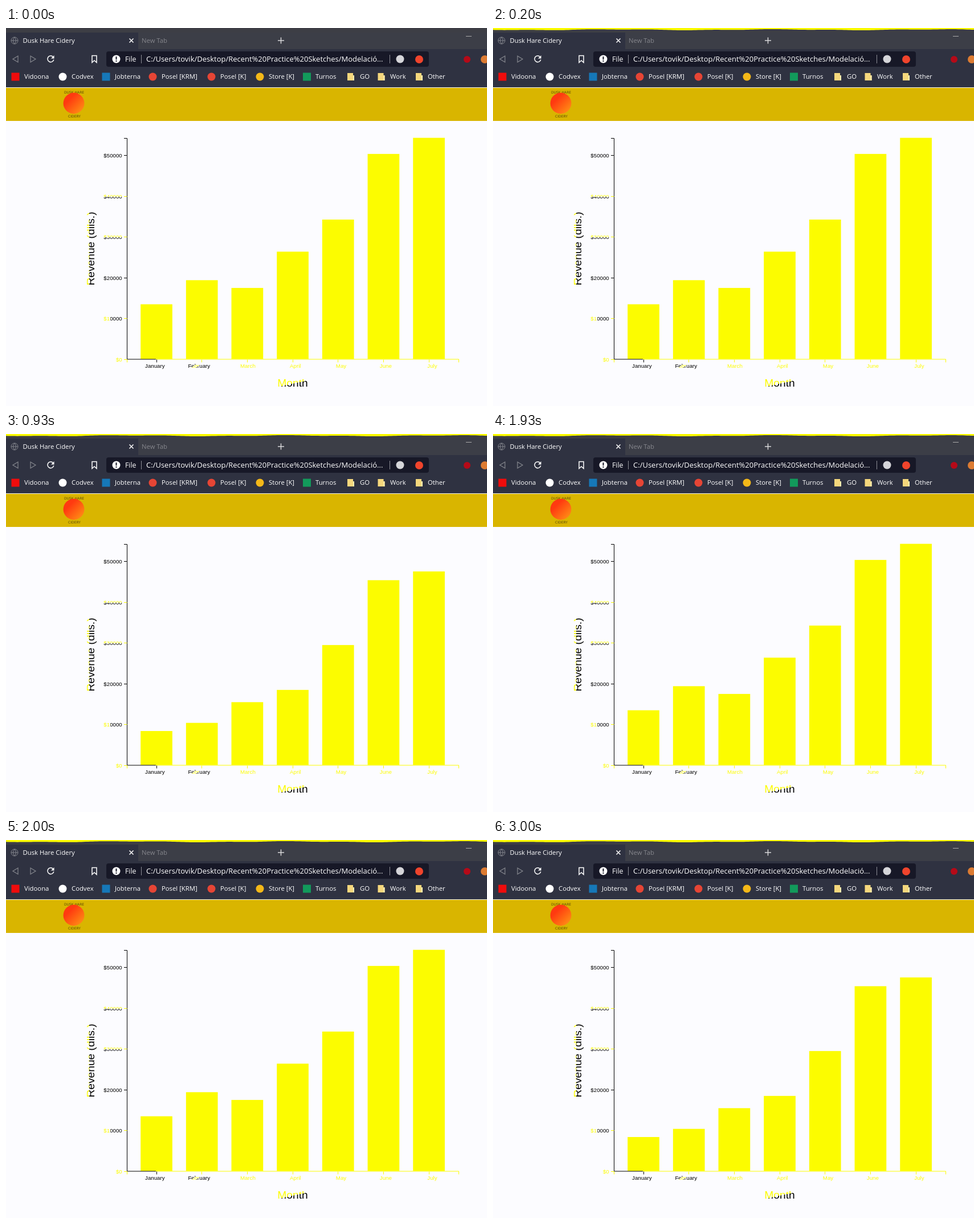
An HTML page that plays this animation: 844 by 663 pixels, repeating every 3.54 s.

```html
<!DOCTYPE html>
<html lang="en">
<head>
<meta charset="utf-8">
<title>Revenue chart</title>
<style>
html, body { margin: 0; width: 100%; height: 100%; overflow: hidden; background: #fcfcff; }
svg { display: block; width: 844px; height: 663px; }
.ui { font: 11.3px "Open Sans", "Noto Sans", sans-serif; fill: #fff; }
.chart { font: 9.7px "Liberation Sans", Arial, sans-serif; }
.title { font-size: 19.2px; text-anchor: middle; }
.end { text-anchor: end; }
.logo { font: 6px "DejaVu Sans", sans-serif; fill: #5c4a08; text-anchor: middle; }
.line { fill: none; stroke: #fff; stroke-width: 1.5; }
</style>
</head>
<body>
<svg id="stage" viewBox="0 0 844 663">
  <defs>
    <linearGradient id="month" gradientUnits="userSpaceOnUse" x1="500" y1="612" x2="505" y2="636">
      <stop offset=".5" stop-color="#fcfc00"/><stop offset=".5"/>
    </linearGradient>
    <linearGradient id="revenue" gradientUnits="userSpaceOnUse" x1="0" y1="-14" x2="0" y2="0">
      <stop offset=".4" stop-color="#fcfc00"/><stop offset=".4"/>
    </linearGradient>
    <linearGradient id="half" x2="0" y2="1">
      <stop offset=".55" stop-color="#fcfc00"/><stop offset=".55"/>
    </linearGradient>
    <linearGradient id="side">
      <stop offset=".36" stop-color="#fcfc00"/><stop offset=".36"/>
    </linearGradient>
    <linearGradient id="mid" y2=".4">
      <stop offset=".42"/><stop offset=".42" stop-color="#fcfc00"/>
      <stop offset=".6" stop-color="#fcfc00"/><stop offset=".6"/>
    </linearGradient>
    <linearGradient id="ember" x2="1" y2="1">
      <stop offset=".3" stop-color="#ff3a10"/><stop offset="1" stop-color="#ff9c16"/>
    </linearGradient>
  </defs>

  <!-- Browser window -->
  <g class="ui">
    <rect width="844" height="104" fill="#2f3241"/>
    <rect width="844" height="8" fill="#3d3e45"/>
    <rect x="232" y="8" width="612" height="29" fill="#3c3e47"/>
    <path id="strip" fill="#fcfc00"/>
    <g fill="none" stroke="#85878e">
      <circle cx="15" cy="22" r="6"/>
      <path d="M9 22H21M15 16Q10 22 15 28M15 16Q20 22 15 28"/>
      <path d="M21 49V60L12 54.5ZM43 49V60L52 54.5Z" stroke-width="1.2"/>
    </g>
    <text x="29.500" y="26">Dusk Hare Cidery</text>
    <text x="238" y="26" fill="#85868c">New Tab</text>
    <path class="line" d="M216.500 18.500L223.500 25.500M223.500 18.500L216.500 25.500"/>
    <path class="line" d="M477 22H488M482.500 16.500V27.500" stroke-opacity=".8"/>
    <path d="M807 14.500H817" stroke="#aaa"/>
    <path class="line" d="M82.500 50.500A5.500 5.500 0 1 0 83.800 55.500" stroke-width="1.800"/>
    <path d="M84.500 48V53.500H79Z"/>
    <path class="line" d="M151 48.500H159V60.500L155 57L151 60.500Z"/>
    <rect x="176" y="41" width="566" height="27" rx="4" fill="#171827"/>
    <circle cx="193.500" cy="54.500" r="7"/>
    <path d="M193.500 50V55.500M193.500 57V59" stroke="#171827" stroke-width="2"/>
    <text x="209" y="59" font-size="12.300">File</text>
    <path d="M237.500 47V62M673.500 47V62" stroke="#8d8e96"/>
    <text x="246" y="59" font-size="13">C:/Users/tovik/Desktop/Recent%20Practice%20Sketches/Modelació...</text>
    <circle cx="691.500" cy="54.500" r="7" fill="#d5d5d9"/>
    <circle cx="725" cy="55" r="7" fill="#f0442c"/>
    <circle cx="809" cy="55" r="6" fill="#b50a18"/>
    <circle cx="840" cy="55" r="7" fill="#dc7b32"/>
    <g id="bookmarks"></g>
  </g>

  <!-- Page header -->
  <rect y="104" width="844" height="1" fill="#f4f4f0"/>
  <rect y="105" width="844" height="58" fill="#d9b500"/>
  <text class="logo" x="119.500" y="115">DUSK HARE</text>
  <circle cx="119" cy="132" r="18.500" fill="url(#ember)"/>
  <text class="logo" x="120" y="157">CIDERY</text>

  <!-- Chart -->
  <g class="chart">
    <g id="bars" fill="#fcfc00"></g>
    <g id="axes" fill="none">
      <path d="M207 193.500H212.500V581H263" stroke="#000"/>
      <path d="M263 581H794.500V586.500M212.500 581.500V586.500" stroke="#fcfc00"/>
    </g>
    <text class="title" x="503" y="629" fill="url(#month)">Month</text>
    <text class="title" transform="translate(154.500 387) rotate(-90)" fill="url(#revenue)">Revenue (dlls.)</text>
  </g>
</svg>
<script>
const LOOP = 3540, BASE = 580.6, SCALE = 388 / 54273, STEP = 79.67;
const YELLOW = "#fcfc00", BLACK = "#000";
const $ = id => document.getElementById(id);

function add(parent, tag, attrs, text = "") {
  const el = document.createElementNS($("stage").namespaceURI, tag);
  for (const key in attrs) el.setAttribute(key, attrs[key]);
  el.textContent = text;
  parent.append(el);
  return el;
}

// Bookmarks: label, text x, icon centre x, shape, colour
const bookmarks = [
  ["Vidoona", 32, 16.5, "square", "#f00c0c"],
  ["Codvex", 115, 99.5, "circle", "#fff"],
  ["Jobterna", 191, 175.5, "square", "#1678b8"],
  ["Posel [KRM]", 273, 257.5, "circle", "#e64535"],
  ["Posel [K]", 376, 360.5, "circle", "#e64535"],
  ["Store [K]", 461, 445.5, "circle", "#f4b818"],
  ["Turnos", 543, 528, "square", "#129a5b"],
  ["GO", 621, 605, "folder"],
  ["Work", 674, 658.5, "folder"],
  ["Other", 740, 725, "folder"]
];
for (const [label, x, cx, shape, fill] of bookmarks) {
  const g = $("bookmarks");
  if (shape === "circle") add(g, "circle", { cx, cy: 85.5, r: 7, fill });
  else if (shape === "square") add(g, "rect", { x: cx - 7, y: 78.5, width: 14, height: 14, fill });
  else {
    add(g, "path", { d: `M${cx - 6} 79h10v4h2v9h-12z`, fill: "#f5d77c" });
    add(g, "path", { d: `M${cx + 4} 83h2v9h-2z`, fill: "#fff0b5" });
  }
  add(g, "text", { x, y: 89 }, label);
}

// Axis ticks and labels
const yFills = [YELLOW, "url(#side)", BLACK, "url(#half)", "url(#half)", BLACK];
yFills.forEach((fill, i) => {
  const y = BASE + .5 - i * 10000 * SCALE;
  const stroke = fill === BLACK ? BLACK : YELLOW;
  add($("axes"), "path", { d: `M207 ${Math.round(y - .5) + .5}h5.5`, stroke });
  add($("axes"), "text", { class: "end", x: 203.7, y: y + 3.5, fill }, "$" + i * 10000);
});

const months = ["January", "February", "March", "April", "May", "June", "July"];
const bars = months.map((name, i) => {
  const x = 236.2 + i * STEP, mid = Math.round(x + 27.3) + .5;
  add($("axes"), "path", { d: `M${mid} 581.5v5`, stroke: i ? YELLOW : BLACK });
  add($("axes"), "text", {
    class: "end", x: x + 42.3, y: 595.5,
    fill: [BLACK, "url(#mid)"][i] || YELLOW
  }, name);
  return add($("bars"), "rect", { x, width: 55.7 });
});

// Uneven lower edge of the strip along the top of the window
let edge = "M0 0H844";
for (let x = 844; x >= 0; x -= 4)
  edge += `L${x} ${(3 + .7 * Math.sin(x / 45) + .4 * Math.sin(x / 17 + 1)).toFixed(2)}`;
$("strip").setAttribute("d", edge + "Z");

const revenue = [13432, 19342, 17443, 26342, 34213, 50321, 54273];
const profit = [8342, 10342, 15423, 18432, 29434, 45343, 47492];

function draw(now) {
  const t = now % LOOP;
  const values = Math.floor((t + 70) / 1000) % 2 ? profit : revenue;
  bars.forEach((bar, i) => {
    const height = values[i] * SCALE;
    bar.setAttribute("y", BASE - height);
    bar.setAttribute("height", height);
  });
  $("strip").setAttribute("visibility", t < 70 ? "hidden" : "visible");
}

const start = performance.now();
function tick() {
  draw(performance.now() - start);
  requestAnimationFrame(tick);
}
tick();
</script>
</body>
</html>
```
